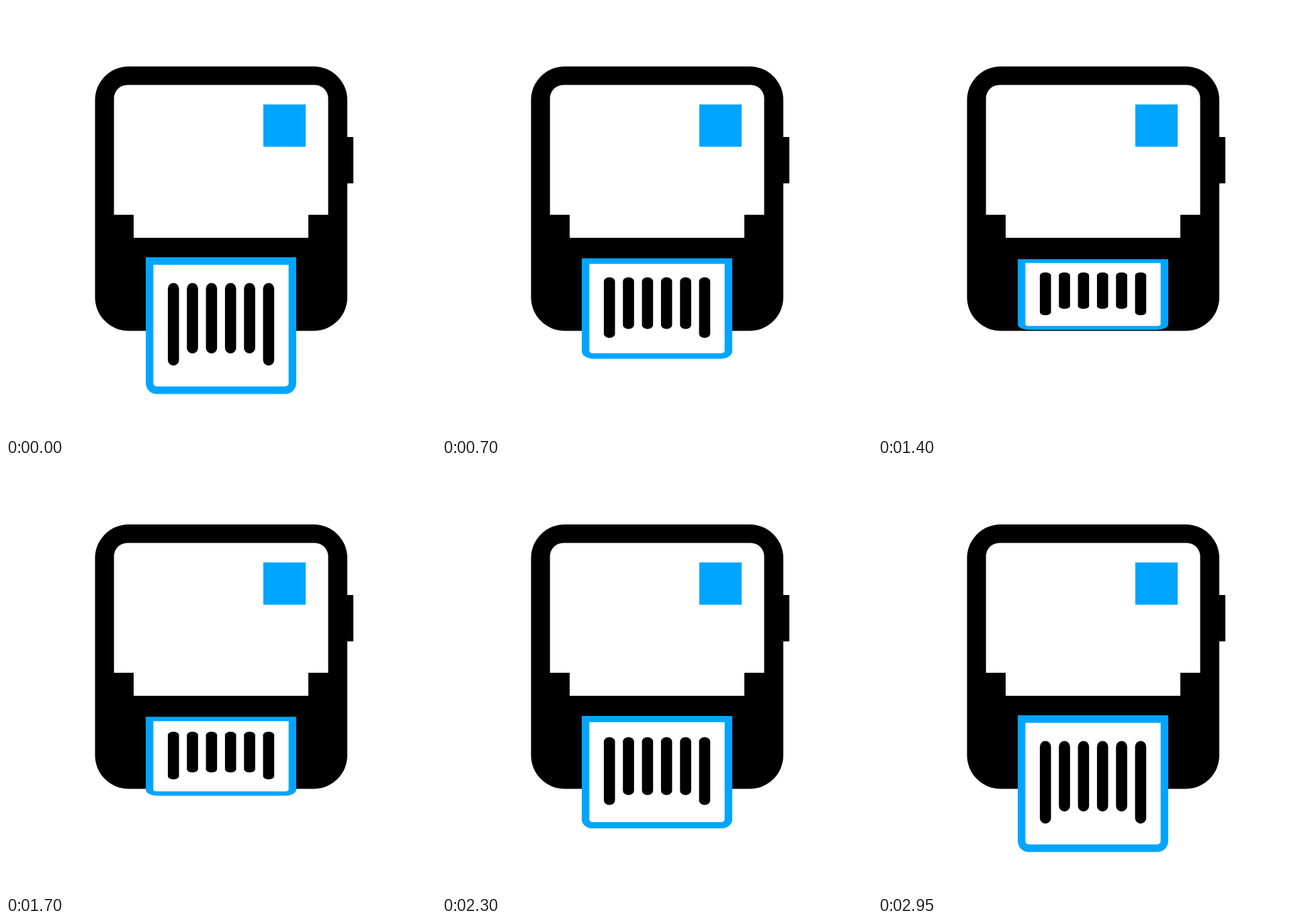
These frames come from a looping animation (640x640 px, 3000 ms). An HTML page:

```html
<!DOCTYPE html>
<html lang="en">
<head>
<meta charset="utf-8">
<title>Label printer</title>
<style>
  html, body { margin: 0; width: 100%; height: 100%; overflow: hidden; background: #fff; }
  svg { display: block; width: 100vw; height: 100vh; }
</style>
</head>
<body>
<svg viewBox="0 0 640 640">
  <rect x="132.5" y="90" width="375.5" height="393.5" rx="50"/>
  <rect x="500" y="195" width="17" height="69"/>
  <path fill="#fff" d="M160.7 310.7V137.5a20 20 0 0 1 20-20H459.5a20 20 0 0 1 20 20V310.7H450V345H190V310.7Z"/>
  <rect x="383" y="146.5" width="63" height="63" fill="#00a5ff"/>
  <g id="paper">
    <path fill="#fff" stroke="#00a5ff" stroke-width="11.3"
      d="M213.7 379.6H426.3V561.4a10.5 10.5 0 0 1-10.5 10.5H224.2a10.5 10.5 0 0 1-10.5-10.5Z"/>
    <g id="bars" stroke="#000" stroke-width="16.6" stroke-linecap="round"></g>
  </g>
</svg>
<script>
  const LOOP = 3000, SHORTEST = 1333, RISE_END = 2975, LEAD = 15;
  const HINGE = 379.6, SHRINK = 0.485;
  const paper = document.getElementById('paper');
  const bars = document.getElementById('bars');

  for (let i = 0; i < 6; i++) {
    const bar = document.createElementNS('http://www.w3.org/2000/svg', 'path');
    const end = i % 5 ? 509 : 527;
    bar.setAttribute('d', `M${249.2 + i * 28.34} 420.6V${end}`);
    bars.append(bar);
  }

  const smooth = x => {
    x = Math.min(1, Math.max(0, x));
    return x * x * (3 - 2 * x);
  };

  // How far the label is drawn in: 0 is fully out.
  const retraction = t => t < SHORTEST
    ? smooth((t + LEAD) / (SHORTEST + LEAD))
    : 1 - smooth((t - SHORTEST) / (RISE_END - SHORTEST));

  function draw(t) {
    const scale = 1 - SHRINK * retraction(t);
    paper.setAttribute('transform', `translate(0 ${HINGE * (1 - scale)}) scale(1 ${scale})`);
  }

  const start = performance.now();
  function tick() {
    draw((performance.now() - start) % LOOP);
    requestAnimationFrame(tick);
  }
  tick();
</script>
</body>
</html>
```
